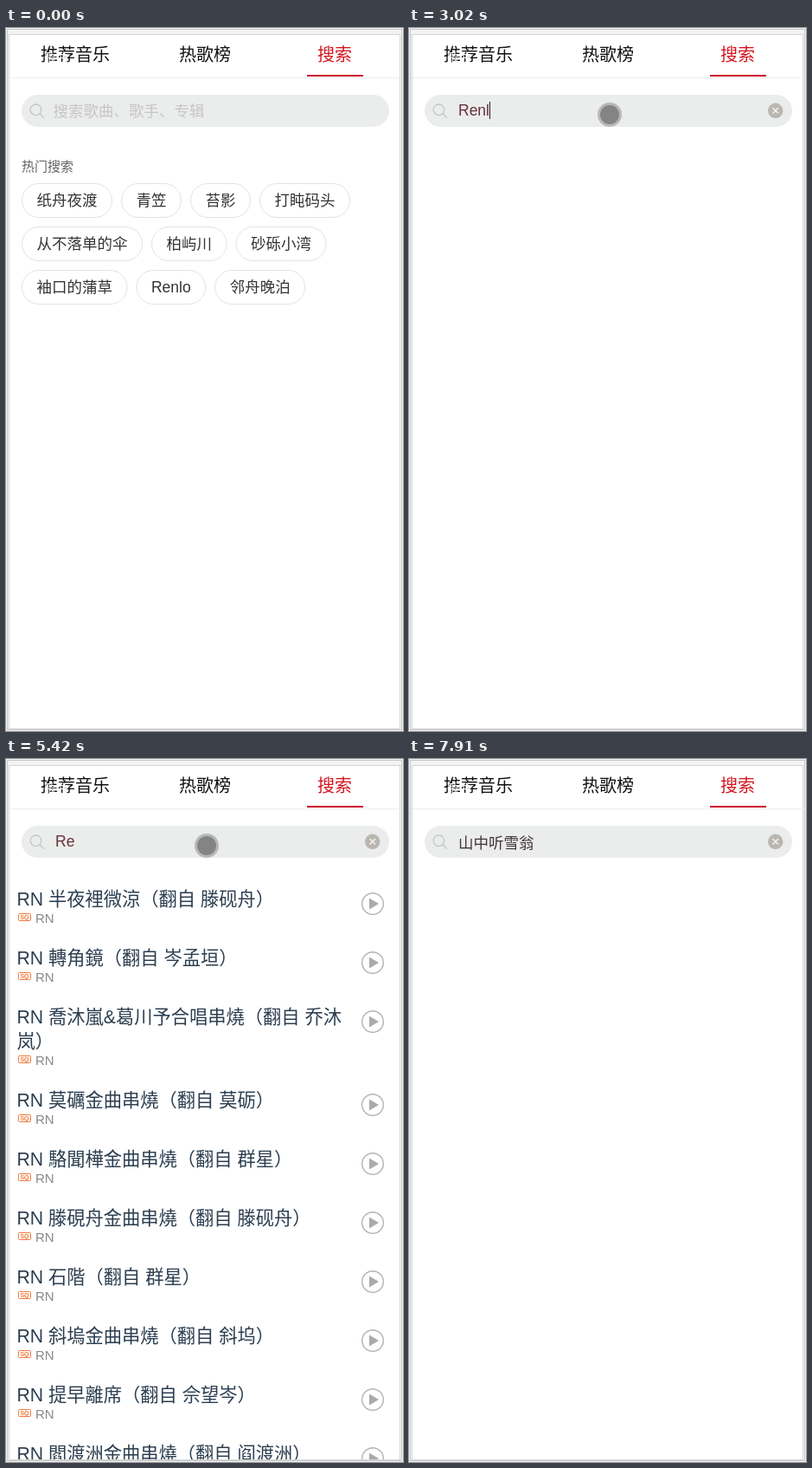
An HTML page that plays this animation: 459 by 811 pixels, repeating every 8000 ms.

```html
<!DOCTYPE html>
<html lang="zh-CN">
<head>
<meta charset="utf-8">
<title>搜索</title>
<style>
html, body { margin: 0; width: 100%; height: 100%; overflow: hidden; background: #f3f3f3; }
svg { display: block; width: 459px; height: 811px;
  font-family: "Liberation Sans", "Noto Sans CJK SC", "Noto Sans CJK", sans-serif; font-weight: 300; }
text { white-space: pre; }
</style>
</head>
<body>
<svg viewBox="0 0 459 811">
  <defs>
    <clipPath id="page"><rect x="4" y="8" width="452" height="800"/></clipPath>
    <radialGradient id="press">
      <stop offset=".3" stop-color="#000" stop-opacity=".55"/>
      <stop offset=".75" stop-color="#000" stop-opacity=".38"/>
      <stop offset="1" stop-color="#000" stop-opacity=".08"/>
    </radialGradient>
  </defs>
  <rect x="1.5" y="1.5" width="456" height="808" fill="#f3f3f3" stroke="#c6c6c6"/>
  <rect x="3.5" y="7.5" width="452" height="801" fill="#fff" stroke="#d6d6d6"/>
  <g font-size="20" fill="#111">
    <text x="40" y="37.5">推荐音乐</text>
    <text x="44" y="39" font-size="14" fill="#fff">歌曲</text>
    <text x="200" y="37.5">热歌榜</text>
    <text x="360" y="37.5" fill="#d4151f">搜索</text>
  </g>
  <path d="M348 55H413" stroke="#cb0c2b" stroke-width="2"/>
  <path d="M4 57.5H456" stroke="#eee"/>
  <rect x="18" y="77" width="425" height="37" rx="18.5" fill="#ebecec"/>
  <g id="scene" clip-path="url(#page)"></g>
</svg>
<script>
const LOOP = 8000, TICK = 76;
const PICKED = '山中听雪翁';

const hotWords = [
  ['纸舟夜渡', '青笠', '苔影', '打盹码头'],
  ['从不落单的伞', '柏屿川', '砂砾小湾'],
  ['袖口的蒲草', 'Renlo', '邻舟晚泊']
];

const songs = {
  full: [
    ['Renlo', '禾氿'], ['Renlo', 'Velom Tarns'], ['Renlo（翻自 禾氿）', 'Dorvin'],
    ['Renlo（翻自 禾氿）', '圆圆qib'], ['Renlo (伴奏)', 'ZUBO-NeL'], ['Renlo', 'Oltem'],
    ['Renlo', 'Pelo Danster'], ['Renlo', 'CloudKVO'], ['Renlo', 'Norvo Pantil'], ['Renlo', 'Oltem']
  ],
  part: [
    ['Renlo', '禾氿'], ['Renlo', 'Velom Tarns'], ['Renlo（翻自 禾氿）', 'Dorvin'],
    ['Renlo（翻自 禾氿）', '圆圆qib'], ['Renlo (Demo)', 'ZUBO-NeL'],
    ['Renlo (Slow Garden Version)', 'Velom Tarns'], ['Renlo', 'Pelo Danster'],
    ['Renlo (Evening Mix)', 'CloudKVO'], ['Renlo', 'Norvo Pantil'], ['Renlo', 'Oltem'], ['Renlo', 'Oltem']
  ],
  covers: [
    '半夜裡微涼（翻自 滕砚舟）', '轉角鏡（翻自 岑孟垣）', '喬沐嵐&amp;葛川予合唱串燒（翻自 乔沐|岚）',
    '莫礪金曲串燒（翻自 莫砺）', '駱聞樺金曲串燒（翻自 群星）', '滕硯舟金曲串燒（翻自 滕砚舟）',
    '石階（翻自 群星）', '斜塢金曲串燒（翻自 斜坞）', '提早離席（翻自 佘望岑）', '閻渡洲金曲串燒（翻自 阎渡洲）'
  ].map(title => ['RN ' + title, 'RN'])
};

const hints = {
  long: ['Renlo', 'Renlo 禾氿', 'Renlo Velom Tarns', 'Renlo (Smooth Winter Garden Version)', 'Renlo (伴奏)', 'Renlo Oltem'],
  mid: ['Renlo', 'Renlo 禾氿', 'Renlo 伴奏', 'Renting', 'Rendoba', '庾禾'],
  short: ['Renlo', 'Rummage Our Gammon', PICKED, '假如灯塔会迷路', 'Regonda', '庾禾']
};

// start, query, view, data key
const steps = [
  [0, '', 'hot'],
  [850, 'Renlo', 'loading'],
  [940, 'Renlo', 'results', 'full'],
  [2180, 'Renlo', 'suggest', 'long'],
  [2940, 'Renl', 'suggest', 'long'],
  [3020, 'Renl', 'blank'],
  [3250, 'Renl', 'results', 'part'],
  [3710, 'Ren', 'suggest', 'long'],
  [4170, 'Ren', 'suggest', 'mid'],
  [4340, 'Re', 'loading'],
  [4490, 'Re', 'results', 'covers'],
  [5510, 'R', 'suggest', 'mid'],
  [5970, 'R', 'suggest', 'short'],
  [7380, PICKED, 'loading'],
  [7910, PICKED, 'blank']
];

// start, end, x, y
const presses = [[680, 1170, 198, 301], [2180, 6830, 232, 100], [7210, 7680, 98, 338]];
const caretFlips = [2180, 2640, 2940, 3480, 3940, 4490, 4960, 5420, 5970, 6430, 6980, 7380];
const caretX = { R: 70, Re: 79, Ren: 89, Renl: 93, Renlo: 103 };

const isCJK = s => /[\u3000-\u9fff\uff00-\uffef]/.test(s);
const text = (x, y, size, fill, s, extra = '') =>
  `<text x="${x}" y="${y}" font-size="${size}" fill="${fill}" ${extra}>${s}</text>`;
const circle = (x, y, r, attrs) => `<circle cx="${x}" cy="${y}" r="${r}" ${attrs}/>`;
const lens = (x, y, color) =>
  `<g fill="none" stroke="${color}" stroke-width="1.3">${circle(x, y, 6.3, '')}<path d="M${x + 4.5} ${y + 4.5}l5 5"/></g>`;

const views = {
  blank: () => '',

  hot() {
    let out = text(18, 164.5, 15, '#666', '热门搜索');
    hotWords.forEach((words, row) => {
      let x = 18, y = 179 + row * 50;
      for (const word of words) {
        const w = 35 + (isCJK(word) ? word.length * 17.5 : 45.7);
        out += `<rect x="${x + .5}" y="${y + .5}" width="${w - 1}" height="39" rx="19.5" fill="none" stroke="#e3e3e3"/>` +
          text(x + w / 2, y + 26, 17.5, '#333', word, 'text-anchor="middle"');
        x += w + 10;
      }
    });
    return out;
  },

  results(query, key) {
    let y = 167, out = '';
    for (const [title, artist] of songs[key]) {
      const lines = title.split('|'), tall = isCJK(title) ? 3 : 0;
      const wrap = (lines.length - 1) * 28;
      const subY = y + 19 + tall + wrap + (isCJK(artist) ? 1 : 0);
      lines.forEach((line, i) => out += text(12.5, y - 1 + tall + i * 28, 21.25, '#2c3e50', line));
      out += `<rect x="14.5" y="${subY - 10.5}" width="14" height="8" rx="1" fill="none" stroke="#f0783c"/>` +
        text(21.5, subY - 4, 7, '#f0783c', 'SQ', 'text-anchor="middle" font-weight="700"') +
        text(34, subY, 15, '#888', artist) +
        circle(424, y, 12.3, 'fill="none" stroke="#b3b3b3" stroke-width="1.4"') +
        `<path d="M420 ${y - 6.5}L431 ${y}L420 ${y + 6.5}Z" fill="#aaa"/>`;
      y += 65 + tall + wrap;
    }
    return out;
  },

  suggest(query, key) {
    let out = text(18, 170, 18.75, '#507daf', `搜索“${query}”`);
    hints[key].forEach((hint, i) => {
      const y = 56.25 * i;
      out += lens(24.7, 221.5 + y, '#b4b4b4') + text(45, Math.round(229.8 + y), 18.75, '#333', hint) +
        `<path d="M45 ${Math.floor(251 + y) + .5}H455" stroke="#f0f0f0"/>`;
    });
    return out;
  },

  loading(query, key, elapsed) {
    const count = 15, turn = Math.floor(elapsed / TICK);
    let out = '';
    for (let i = 0; i < count; i++) {
      const a = (turn - i) * 2 * Math.PI / count;
      out += circle(229.3 + 15.3 * Math.cos(a), 153.3 + 15.3 * Math.sin(a), 3 * (1 - i / count), 'fill="#dd0a26"');
    }
    return out;
  }
};

function searchField(query, t) {
  let out = lens(34.5, 94.3, '#c6c6c6');
  if (!query) return out + text(54.5, 102, 17.5, '#c6c6c6', '搜索歌曲、歌手、专辑');
  out += text(57, isCJK(query) ? 102.5 : 101, 17.5, isCJK(query) ? '#40343a' : '#66323a', query) +
    circle(423.7, 95.3, 8.7, 'fill="#bab6b0"') +
    '<path d="M420.5 92l6.5 6.5m0-6.5l-6.5 6.5" stroke="#f4f3f2" stroke-width="1.5"/>';
  const flips = caretFlips.filter(at => at <= t).length;
  if (flips % 2) out += `<rect x="${caretX[query]}" y="85" width="1" height="20" fill="#222"/>`;
  return out;
}

function pointer(t) {
  const press = presses.find(([from, to]) => t >= from && t < to);
  if (!press) return '';
  const [from, , x, y] = press;
  if (from !== 2180 && t < from + 170) return circle(x, y, 14, 'fill="url(#press)"');
  return circle(x, y, 14, 'fill="#000" fill-opacity=".22"') + circle(x, y, 11, 'fill="#000" fill-opacity=".28"');
}

function render(t) {
  const [start, query, view, key] = steps.findLast(step => step[0] <= t);
  return searchField(query, t) + views[view](query, key, t - start) + pointer(t);
}

const scene = document.getElementById('scene');
let shown;
function frame() {
  const markup = render(performance.now() % LOOP);
  if (markup !== shown) scene.innerHTML = shown = markup;
  requestAnimationFrame(frame);
}
frame();
</script>
</body>
</html>
```
